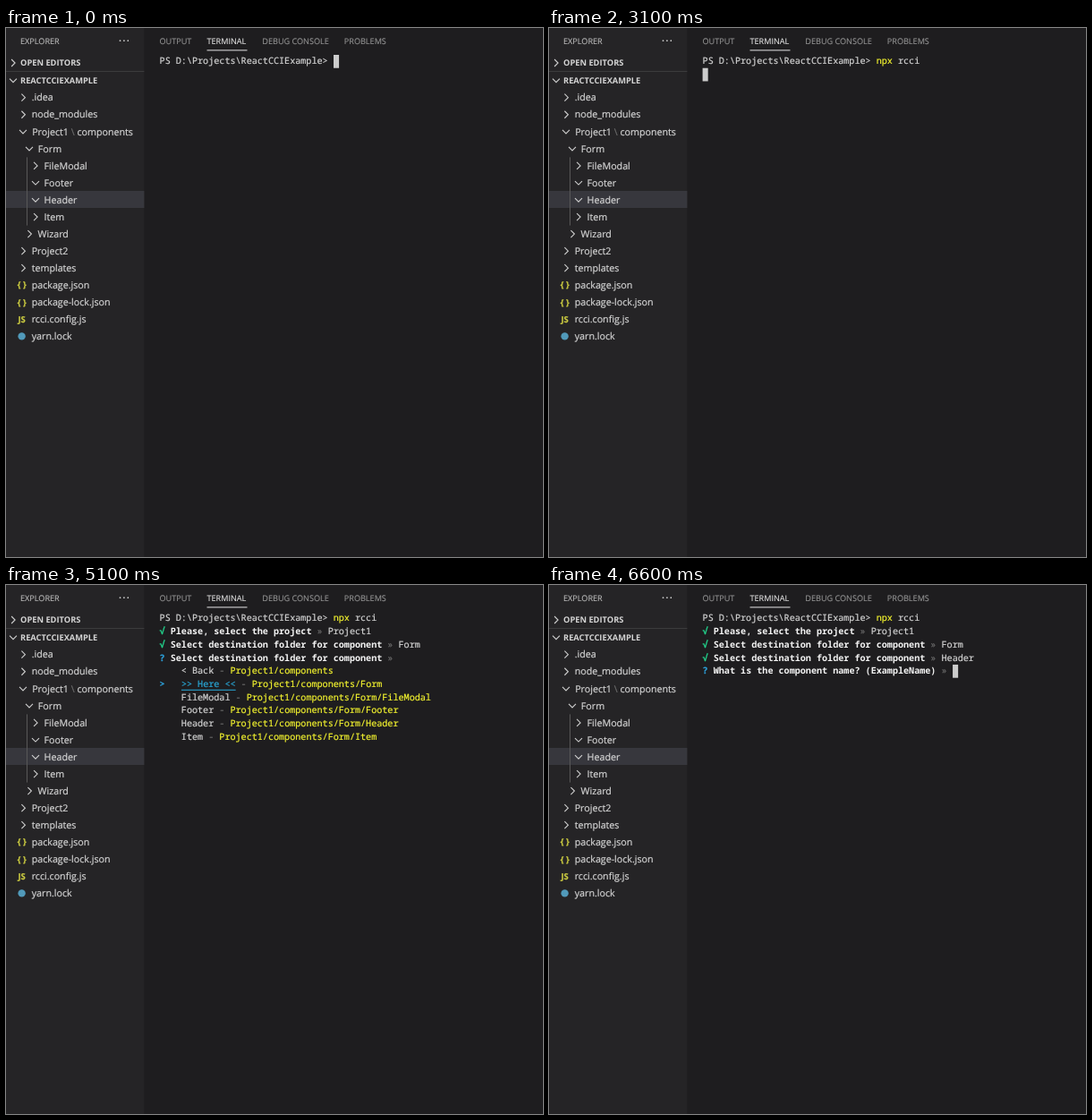
These frames come from a looping animation (600 px wide and 591 px high, 8000 ms). An HTML page:

```html
<!DOCTYPE html>
<html lang="en">
<head>
<meta charset="utf-8">
<title>Terminal session</title>
<style>
  html, body { margin: 0; width: 100%; height: 100%; overflow: hidden; background: #1e1d1f; }
  svg { display: block; width: 100%; height: 100%; }
  text {
    color: #d4d4d4; fill: currentColor; stroke: currentColor; stroke-width: .2;
    white-space: pre; text-rendering: geometricPrecision;
  }
  tspan { fill: currentColor; stroke: currentColor; }
  .ui { font: 10.7px "Open Sans", "Noto Sans", sans-serif; }
  .caps { font: 9.1px "Open Sans", "Noto Sans", sans-serif; color: #bbb; stroke-width: .1; }
  .head { font: 700 9.3px "Open Sans", "Noto Sans", sans-serif; stroke-width: 0; }
  .icon { font: 700 9.5px "Open Sans", "Noto Sans", sans-serif; color: #cbcb41; }
  .off { color: #969696; }
  .on { color: #e7e7e7; }
  .dim { color: #6a6a6a; }
  .arrow { fill: none; stroke: #d0d0d0; stroke-width: 1.1; }
  #term text { font: 10.125px "Noto Sans Mono", "DejaVu Sans Mono", monospace; }
  #term .b { font-weight: 700; color: #f4f4f4; stroke-width: 0; }
  #term .ok { font-weight: 700; color: #23d18b; }
  #term .ask { font-weight: 700; color: #2d9fd8; }
  #term .pick { color: #29a8d8; }
  #term .y { color: #f5f52f; }
</style>
</head>
<body>
<svg viewBox="0 0 600 591" preserveAspectRatio="none">
  <rect width="600" height="591" fill="#1e1d1f"/>
  <rect width="154.4" height="591" fill="#252426"/>
  <g id="side"></g>
  <g id="tabs"></g>
  <g id="term"></g>
</svg>
<script>
const $ = id => document.getElementById(id);
const esc = s => s.replace(/&/g, "&amp;").replace(/</g, "&lt;");
const span = (cls, s) => `<tspan class="${cls}">${esc(s)}</tspan>`;
const text = (x, y, s, cls) => `<text x="${x}" y="${y}" class="${cls}" xml:space="preserve">${s}</text>`;
const rect = (x, y, w, h, fill) => `<rect x="${x}" y="${y}" width="${w}" height="${h}" fill="${fill}"/>`;
const arrow = (x, y, open) => `<path class="arrow" d="M${open
  ? `${x - 4} ${y - 1.9}l4 4 4-4` : `${x - 1.9} ${y - 4}l4 4-4 4`}"/>`;

// Sidebar
const ROW = 19.05, TOP = 77.7;
const tree = [ // kind, icon x, label x, label
  [">", 19.3, 28.7, ".idea"],
  [">", 19.3, 28.7, "node_modules"],
  ["v", 19, 29.2, `Project1 ${span("dim", "\\")} components`],
  ["v", 26, 35.8, "Form"],
  [">", 33, 42.6, "FileModal"],
  ["v", 33, 42.6, "Footer"],
  ["v", 33, 42.6, "Header"],
  [">", 33, 42.6, "Item"],
  [">", 26.3, 35.6, "Wizard"],
  [">", 19.3, 28.7, "Project2"],
  [">", 19.3, 28.7, "templates"],
  ["{ }", 12.8, 28.7, "package.json"],
  ["{ }", 12.8, 28.7, "package-lock.json"],
  ["JS", 13.4, 28.7, "rcci.config.js"],
  ["dot", 17.6, 28.7, "yarn.lock"]
];

function sidebar() {
  let out = text(16, 18, "EXPLORER", "caps");
  for (const x of [127.5, 131.9, 136.3]) out += `<circle cx="${x}" cy="14.2" r=".85" fill="#ccc"/>`;
  out += arrow(8, 39, false) + text(16, 42.3, "OPEN EDITORS", "head");
  out += rect(0, 48, 154.4, 1, "#3c3c3d");
  out += arrow(8, 58.6, true) + text(16, 62, "REACTCCIEXAMPLE", "head");
  out += rect(0, 182, 154.4, 19, "#37373d");
  out += rect(23, 144.4, 1, 4 * ROW, "#585858");
  tree.forEach(([kind, ix, x, label], i) => {
    const y = TOP + i * ROW;
    if (kind == ">" || kind == "v") out += arrow(ix, y, kind == "v");
    else if (kind == "dot") out += `<circle cx="${ix}" cy="${y}" r="4.2" fill="#519aba"/>`;
    else out += text(ix, y + 3.2, kind, "icon");
    out += text(x, y + 3.7, label, "ui");
  });
  return out;
}
$("side").innerHTML = sidebar();

$("tabs").innerHTML = [[171.5, "OUTPUT"], [224.5, "TERMINAL"], [286.3, "DEBUG CONSOLE"], [377.8, "PROBLEMS"]]
  .map(([x, s]) => text(x, 18, s, "caps " + (s == "TERMINAL" ? "on" : "off"))).join("")
  + rect(224.5, 24.4, 45, 1, "#e7e7e7");

// Terminal
const CELL = 6.075, LINE = 14.74, LEFT = 171.6, FIRST = 29.6;
const prompt = s => "PS D:\\Projects\\ReactCCIExample> " + span("y", s.slice(0, 3)) + s.slice(3);
const ask = (q, a = "") => span("ask", "? ") + span("b", q) + span("dim", " » ") + a;
const done = (q, a) => span("ok", "√ ") + span("b", q) + span("dim", " » ") + a;

const WHICH = "Please, select the project";
const WHERE = "Select destination folder for component";
const BASE = "Project1/components";
const HERE = ">> Here <<";
const COMMAND = "npx rcci";

// Menu entries are [label, path]; the chosen one is coloured and underlined.
const menu = (items, chosen) => items.map(([label, path], i) => ({
  html: (i == chosen ? span("ask", ">") + "   " + span("pick", label) : "    " + esc(label))
    + (path ? span("dim", " - ") + span("y", path) : ""),
  mark: i == chosen ? label.length : 0
}));

const rootMenu = [[HERE, BASE], ["Form", BASE + "/Form"], ["Wizard", BASE + "/Wizard"]];
const formMenu = [["< Back", BASE], [HERE, BASE + "/Form"],
  ...["FileModal", "Footer", "Header", "Item"].map(n => [n, `${BASE}/Form/${n}`])];
const found = [formMenu[0], formMenu[1], formMenu[4]];

const ran = prompt(COMMAND);
const one = [ran, done(WHICH, "Project1")];
const two = [...one, done(WHERE, "Form")];
const typed = n => ({ lines: [prompt(COMMAND.slice(0, n))], cursor: [32 + n, 0] });

const steps = [
  [0, typed(0)],
  ...[500, 900, 1000, 1200, 1700, 2200, 2300, 2600].map((t, i) => [t, typed(i + 1)]),
  [3000, { lines: [ran], cursor: [0, 1] }],
  [3600, {
    lines: [ran, ask(WHICH, span("dim", "- Use arrow-keys. Return to submit.")),
      ...menu([["Project1"], ["Project2"]], 0)],
    cursor: [66, 3]
  }],
  [4100, { lines: [...one, ask(WHERE), ...menu(rootMenu, 0)] }],
  [4700, { lines: [...one, ask(WHERE), ...menu(rootMenu, 1)] }],
  [4900, { lines: [...two, ask(WHERE), ...menu(formMenu, 1)] }],
  [5700, { lines: [...two, ask(WHERE, "h"), ...menu(found, 1)] }],
  [5900, { lines: [...two, ask(WHERE, "h"), ...menu(found, 2)] }],
  [6400, {
    lines: [...two, done(WHERE, "Header"), ask("What is the component name? (ExampleName)")],
    cursor: [46, 4]
  }]
];

function draw({ lines, cursor }) {
  let out = "";
  lines.forEach((line, i) => {
    const y = FIRST + i * LINE;
    out += text(LEFT, y + 10.7, line.html || line, "");
    if (line.mark) out += rect(LEFT + 4 * CELL, y + 13.5, line.mark * CELL, 1, "#29a8d8");
  });
  if (cursor) out += rect(LEFT + cursor[0] * CELL, FIRST + .4 + cursor[1] * LINE, CELL, LINE, "#ccc");
  $("term").innerHTML = out;
}

const start = performance.now();
let shown;
function tick() {
  const t = (performance.now() - start) % 8000;
  const state = steps.findLast(s => s[0] <= t)[1];
  if (state != shown) draw(shown = state);
  requestAnimationFrame(tick);
}
tick();
</script>
</body>
</html>
```
